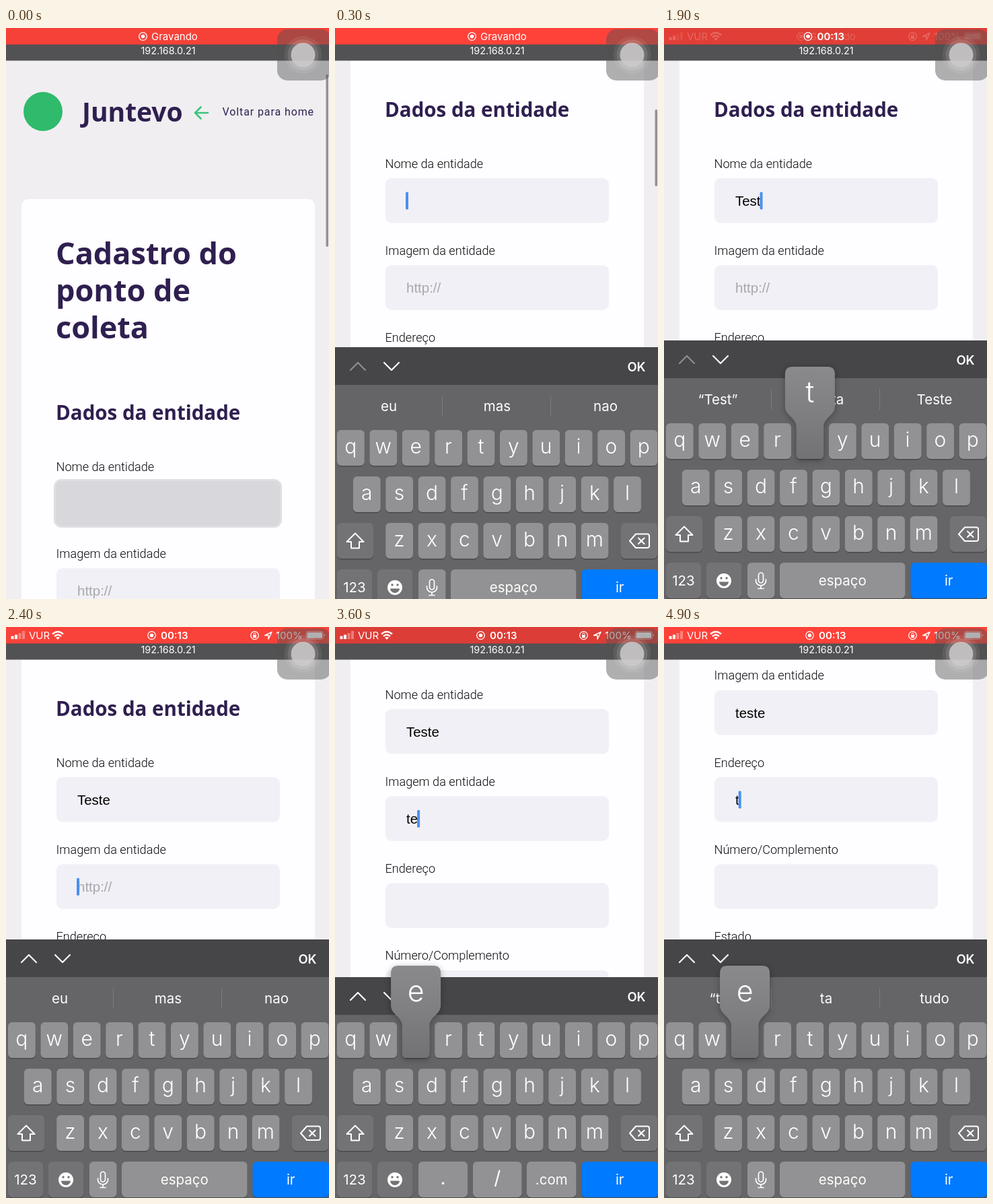
These frames come from a looping animation (480 by 848 pixels, 5000 ms). An HTML page:

```html
<!DOCTYPE html>
<html lang="pt-BR">
<head>
<meta charset="utf-8">
<title>Cadastro do ponto de coleta</title>
<style>
html, body { margin: 0; width: 100%; height: 100%; overflow: hidden; background: #f0eef1; }
svg { display: block; width: 100vw; height: 100vh; }
text { font-family: Inter, Roboto, sans-serif; white-space: pre; }
.title { font-family: "Noto Sans", "Open Sans", sans-serif; font-weight: 700; fill: #2f1f50; }
.label { font: 300 18.15px Roboto, sans-serif; fill: #0c0c0e; }
.value { font: 20.48px "Liberation Sans", Arial, sans-serif; fill: #000; }
.hint { fill: #a9a8ac; }
.mid { text-anchor: middle; }
.bar { font-size: 15px; fill: #fff; }
.kb text { fill: #fff; text-anchor: middle; font-size: 20.5px; }
.kb .letter { font-size: 30px; font-weight: 300; }
.line { fill: none; stroke: #fff; stroke-width: 2.2; stroke-linecap: round; stroke-linejoin: round; }
#bubble { fill: url(#shade); filter: drop-shadow(0 2px 5px rgba(0, 0, 0, .3)); }
</style>
</head>
<body>
<svg viewBox="0 0 480 848" xmlns="http://www.w3.org/2000/svg">
  <defs>
    <linearGradient id="shade" x2="0" y2="1">
      <stop offset="0" stop-color="#8a898b"/><stop offset=".5" stop-color="#7f7e80"/><stop offset="1" stop-color="#727173"/>
    </linearGradient>
  </defs>
  <rect width="480" height="848" fill="#f0eef1"/>
  <g id="page">
    <circle cx="55" cy="124" r="29" fill="#2fba6c"/>
    <text class="title" x="113" y="139" font-size="39">Juntevo</text>
    <path d="M300 126H281M289.500 117.500L281 126l8.500 8.500" class="line" style="stroke:#3cc47c;stroke-width:2.600"/>
    <text x="321.500" y="130" style="font:16px Roboto,sans-serif;letter-spacing:.9px" fill="#322153">Voltar para home</text>
    <rect x="23" y="254" width="436" height="1600" rx="10" fill="#fefdff"/>
    <g font-size="45">
      <text class="title" x="74" y="351">Cadastro do</text>
      <text class="title" x="74" y="406">ponto de</text>
      <text class="title" x="74" y="461">coleta</text>
    </g>
    <text class="title" x="74" y="582" font-size="29.500">Dados da entidade</text>
    <g id="form"></g>
    <rect id="tap" x="72.500" y="671.500" width="336" height="69" rx="10" fill="#d7d7dc" stroke="#dfdee3" stroke-width="3"/>
    <rect id="caret" width="4" height="26" rx="1.500" fill="#4a90ec"/>
  </g>
  <rect id="thumb" x="475.500" width="3.500" rx="1.750" fill="#929194"/>

  <g id="kb" class="kb">
    <rect id="back" y="519" width="480" height="400" fill="#656466"/>
    <g id="tools">
      <rect y="464" width="480" height="56" fill="#464547"/>
      <path id="up" class="line" d="M23 498l11-11 11 11"/>
      <path class="line" d="M73 487l11 11 11-11"/>
      <text x="448" y="499.500" style="font-size:18.500px;font-weight:600">OK</text>
    </g>
    <g id="tips"><path d="M159.500 536v31M320.500 536v31" stroke="#7b7a7c"/></g>
    <g id="keys"></g>
    <path id="shift" d="M30 740.500l12.500 12.500h-6.500v9.500h-12v-9.500h-6.500z" stroke-width="2" stroke-linejoin="round"/>
    <path class="line" style="stroke-width:2" d="M447 741.500h17q3 0 3 3v14.500q0 3-3 3h-17l-9-10.250zM451 747.500l8.500 8.500M459.500 747.500l-8.500 8.500"/>
    <g>
      <circle cx="89" cy="821" r="11" fill="#fff"/>
      <path d="M82 822.500h14a7 6.500 0 0 1-14 0z" fill="#737274"/>
      <circle cx="85" cy="817" r="1.700" fill="#737274"/><circle cx="93" cy="817" r="1.700" fill="#737274"/>
    </g>
    <g id="textRow">
      <g id="textKeys"></g>
      <rect class="line" x="140.500" y="809" width="7" height="15" rx="3.500" style="stroke-width:1.700"/>
      <path class="line" style="stroke-width:1.700" d="M136.500 819v2a7.500 7 0 0 0 15 0v-2M144 828v4.500M140 832.500h8"/>
    </g>
    <g id="urlRow"></g>
    <g id="pop">
      <path id="bubble" d="M-37-73q0-11 11-11h52q11 0 11 11v48c0 14-17 16-17 32v40q0 6-6 6h-28q-6 0-6-6v-40c0-16-17-18-17-32z"/>
      <text id="popText" y="-31" style="font-size:43px;font-weight:300"></text>
    </g>
  </g>

  <rect y="24" width="480" height="24.500" fill="#525154"/>
  <text class="mid" x="241" y="39" font-size="14.400" fill="#fff">192.168.0.21</text>
  <rect id="red" width="480" height="24.500"/>
  <g id="rec">
    <g transform="translate(203.500 12.500)"><circle r="5.800" class="line" style="stroke-width:1.300"/><circle r="2.800" fill="#fff"/></g>
    <text class="bar" x="216" y="18">Gravando</text>
  </g>
  <g id="clock">
    <g transform="translate(216.500 12.500)"><circle r="5.800" class="line" style="stroke-width:1.300"/><circle r="2.800" fill="#fff"/></g>
    <text class="bar" x="230" y="18" font-weight="600">00:13</text>
  </g>
  <g id="info">
    <path d="M7.500 13.500h4v4.500h-4zM13 11.500h4v6.500h-4z" fill="#fff"/>
    <path d="M18.500 9h4v9h-4zM24 6h4v12h-4z" fill="#fff" opacity=".35"/>
    <text class="bar" x="34" y="18">VUR</text>
    <path class="line" style="stroke-linecap:butt;stroke-width:2.400" d="M69 10.500q8-7 16 0M72 13.800q5-4.500 10 0"/>
    <path d="M74 15.800q3-2.200 6 0l-3 3z" fill="#fff"/>
    <circle cx="369.500" cy="12.500" r="5.800" class="line" style="stroke-width:1.300"/>
    <path d="M367 12h5v4h-5z" fill="#fff"/>
    <path class="line" style="stroke-width:1" d="M368 12v-1.500a1.500 1.500 0 0 1 3 0v1.500"/>
    <path class="line" style="stroke-width:1.400" d="M395 7.500l-10.500 5h5.500v5.500z"/>
    <text class="bar" x="401" y="18">100%</text>
    <rect x="446" y="6.500" width="25.500" height="11.500" rx="3" class="line" style="stroke-width:1;stroke-opacity:.6"/>
    <rect x="447.500" y="8" width="22.500" height="8.500" rx="1.500" fill="#fff"/>
    <path d="M473 10.500q2 1.700 0 3.500z" fill="#fff"/>
  </g>
  <rect x="403" y="2" width="80" height="76" rx="15" fill="#505050" fill-opacity=".45"/>
  <g fill="#fff">
    <circle cx="441.500" cy="40" r="28" opacity=".07"/>
    <circle cx="441.500" cy="40" r="23" opacity=".12"/>
    <circle cx="441.500" cy="40" r="18" fill="#cdcacc" opacity=".85"/>
  </g>
</svg>
<script>
const $ = id => document.getElementById(id);
const LOOP = 5000, STEP = 100, PITCH = 48.4, GAP = 129.25;

function add(parent, tag, attrs, text) {
  const node = document.createElementNS('http://www.w3.org/2000/svg', tag);
  for (const k in attrs) node.setAttribute(k, attrs[k]);
  if (text) node.textContent = text;
  parent.appendChild(node);
  return node;
}

// Form fields
const fields = ['Nome da entidade', 'Imagem da entidade', 'Endereço',
                'Número/Complemento', 'Estado', 'Cidade'].map((name, i) => {
  const y = 673 + i * GAP, form = $('form');
  add(form, 'text', { class: 'label', x: 74.5, y: y - 15.5 }, name);
  add(form, 'rect', { x: 75, y, width: 332, height: 66.5, rx: 9, fill: '#f1f0f6' });
  return { y, text: add(form, 'text', { class: 'value', x: 106, y: y + 41 }) };
});

// Keyboard
const LIGHT = '#929193', DARK = '#737274', BLUE = '#007aff';
function key(parent, x, y, width, fill, label) {
  add(parent, 'rect', { x, y: y + 1.5, width, height: 53, rx: 6, fill: '#4a494b' });
  const face = add(parent, 'rect', { x, y, width, height: 53, rx: 6, fill });
  if (label) add(parent, 'text', { x: x + width / 2, y: y + 33.5 }, label);
  return face;
}
const letters = {};
[['qwertyuiop', 3, 587], ['asdfghjkl', 26.9, 656], ['zxcvbnm', 75.2, 725]].forEach(([row, x0, y]) => {
  [...row].forEach((c, i) => {
    const x = x0 + i * PITCH, cx = x + 20.3;
    key($('keys'), x, y, 40.8, LIGHT);
    letters[c] = { cx, y, text: add($('keys'), 'text', { class: 'letter', x: cx }) };
  });
});
const shiftKey = key($('keys'), 3, 725, 54, DARK);
key($('keys'), 425, 725, 54, DARK);
key($('keys'), 3, 794, 52, DARK, '123');
key($('keys'), 63, 794, 52.5, DARK);
key($('keys'), 366.5, 794, 113.5, BLUE, 'ir');
key($('textKeys'), 124, 794, 40.5, LIGHT);
key($('textKeys'), 172, 794, 186.5, LIGHT, 'espaço');
key($('urlRow'), 124, 794, 73, LIGHT, '.');
key($('urlRow'), 205, 794, 72.5, LIGHT, '/');
key($('urlRow'), 285, 794, 73.5, LIGHT, '.com');
$('urlRow').querySelectorAll('text').forEach((n, i) => { if (i < 2) n.style.fontSize = '28px'; });
const tips = [80, 241, 402].map(x => add($('tips'), 'text', { x, y: 559 }));

// time, field, pressed key, field text, suggestions
const strokes = [
  [1300, 0, 'T', 'T', '“T”|Te|Tudo'],
  [1500, 0, 'e', 'Te', '“Te”|Tem|Tenho'],
  [1700, 0, 's', 'Tes', '“Tes”|Teste|Testa'],
  [1900, 0, 't', 'Test', '“Test”|Testa|Teste'],
  [2100, 0, 'e', 'Teste', '“Teste”|Testes|Testei'],
  [3400, 1, 't', 't'],
  [3600, 1, 'e', 'te'],
  [3800, 1, 's', 'tes'],
  [4000, 1, 't', 'test'],
  [4200, 1, 'e', 'teste'],
  [4700, 2, 't', 't', '“t”|ta|tudo'],
  [4900, 2, 'e', 't', '“t”|ta|tudo']
];
const moves = {
  scroll: [[0, 0], [100, 150], [200, 410], [300, 450], [2400, 450], [2500, 500], [2600, 540],
           [2700, 551], [4400, 551], [4500, 640], [4600, 708.5]],
  rise: [[0, 390], [100, 250], [200, 70], [300, 10], [400, 0]],
  tap: [[0, 1], [200, 0]],
  thumbY: [[0, 69], [300, 121]],
  thumbH: [[0, 256], [300, 114]],
  thumb: [[800, 1], [1100, .1], [1200, 0]],
  rec: [[1800, 1], [1900, .18], [2000, 0]],
  clock: [[1800, 0], [1900, 1]],
  clockX: [[1900, -2.5], [2000, 0]],
  info: [[1800, 0], [1900, .22], [2100, 1]]
};
const blinkOff = [[700, 1000], [3000, 3300]];

function at(t, steps) {
  let [t0, v0] = steps[0];
  for (const [t1, v1] of steps) {
    if (t < t1) return t <= t0 ? v0 : v0 + (v1 - v0) * (t - t0) / (t1 - t0);
    [t0, v0] = [t1, v1];
  }
  return v0;
}
const show = (node, on) => node.setAttribute('visibility', on ? 'visible' : 'hidden');
const move = (node, x, y) => node.setAttribute('transform', `translate(${x} ${y})`);

function draw(t) {
  const now = {};
  for (const k in moves) now[k] = at(t, moves[k]);
  const focus = t < 200 ? -1 : t < 2400 ? 0 : t < 4400 ? 1 : 2;
  const url = t >= 2500 && t < 4500;
  const caps = t >= 400 && t < 1400;

  const values = ['', '', ''];
  let tip = caps ? 'Eu|Mas|Nao' : 'eu|mas|nao', pressed = null;
  for (const [time, i, c, text, words] of strokes) {
    if (time > t) break;
    values[i] = text;
    if (i === focus && words) tip = words;
    pressed = t < time + STEP ? c : null;
  }

  move($('page'), 0, -now.scroll);
  values.forEach((v, i) => {
    const node = fields[i].text, hint = i === 1 && !v;
    node.textContent = hint ? 'http://' : v;
    node.classList.toggle('hint', hint);
  });
  $('tap').setAttribute('opacity', now.tap);
  show($('caret'), focus >= 0 && !blinkOff.some(([a, b]) => t >= a && t < b));
  if (focus >= 0) {
    const width = values[focus] ? fields[focus].text.getComputedTextLength() : 0;
    move($('caret'), 105 + width, fields[focus].y + 20.5);
  }

  $('thumb').setAttribute('y', now.thumbY);
  $('thumb').setAttribute('height', now.thumbH);
  $('thumb').setAttribute('opacity', now.thumb);

  move($('kb'), 0, now.rise);
  move($('tools'), 0, url ? 56 : 0);
  $('back').setAttribute('y', url ? 575 : 519);
  $('up').style.stroke = focus > 0 ? '#fff' : '#8f8e90';
  show($('tips'), !url);
  show($('textRow'), !url);
  show($('urlRow'), url);
  tip.split('|').forEach((word, i) => { tips[i].textContent = word; });
  for (const c in letters) {
    const { y, text } = letters[c];
    text.textContent = caps ? c.toUpperCase() : c;
    text.setAttribute('y', y + (caps ? 37.5 : 35));
  }
  shiftKey.setAttribute('fill', caps ? '#e0dfe1' : DARK);
  $('shift').setAttribute('fill', caps ? '#000' : 'none');
  $('shift').setAttribute('stroke', caps ? '#000' : '#fff');
  show($('pop'), pressed);
  if (pressed) {
    const { cx, y } = letters[pressed.toLowerCase()];
    move($('pop'), cx, y);
    $('popText').textContent = pressed;
  }

  const glow = Math.cos((t - 400) / 2300 * 2 * Math.PI);
  $('red').setAttribute('fill', `rgb(${236 + 20 * glow | 0},${64 + 3 * glow | 0},${56 + 2 * glow | 0})`);
  for (const k of ['rec', 'clock', 'info']) $(k).setAttribute('opacity', now[k]);
  move($('clock'), now.clockX, 0);
}

let start = null;
function tick(ms) {
  if (start === null) start = ms;
  draw(Math.floor((ms - start) % LOOP / STEP) * STEP);
  requestAnimationFrame(tick);
}
draw(0);
requestAnimationFrame(tick);
</script>
</body>
</html>
```
